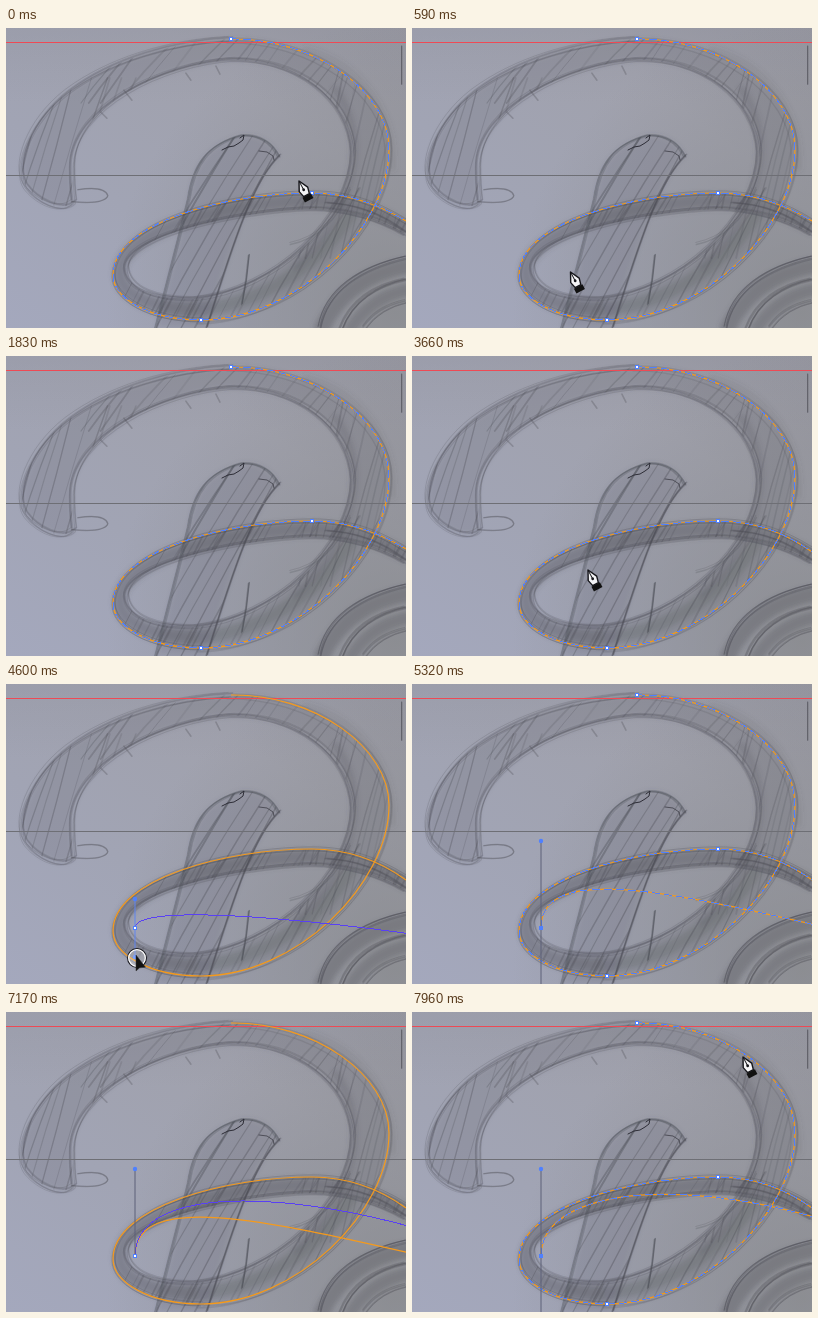
Animation, 400 px wide and 300 px high, one loop 8 s. Source, as an HTML page:

```html
<!DOCTYPE html>
<html lang="en">
<head>
<meta charset="utf-8">
<title>Tracing a pencil letter</title>
<style>
html, body { margin: 0; width: 100%; height: 100%; overflow: hidden; background: #9fa1af; }
svg { display: block; width: 400px; height: 300px; }
path, line { fill: none; }
.ink path { stroke: #4c4d55; stroke-linecap: round; }
.ink .fill { fill: #54555c; stroke: none; }
.orange { stroke: #f59a1c; stroke-width: 1.2; }
.blue { stroke: #4f80ff; stroke-width: 1; stroke-dasharray: 8 4; shape-rendering: crispEdges; }
.drag { stroke: #5940f4; stroke-width: 1; shape-rendering: crispEdges; }
.anchor { fill: #fff; stroke: #4f80ff; stroke-width: 1; }
.knob { fill: #4f80ff; }
</style>
</head>
<body>
<svg viewBox="0 0 400 300">
  <defs>
    <linearGradient id="paper" x1="0" y1="1" x2="1" y2="0">
      <stop offset="0" stop-color="#a4a8bd"/>
      <stop offset=".35" stop-color="#a1a4b4"/>
      <stop offset=".7" stop-color="#a0a1ac"/>
      <stop offset="1" stop-color="#96969e"/>
    </linearGradient>
    <linearGradient id="shade" x1="0" y1="0" x2="0" y2="1">
      <stop offset="0" stop-color="#8f919f" stop-opacity=".3"/>
      <stop offset=".25" stop-color="#8f919f" stop-opacity="0"/>
    </linearGradient>
    <radialGradient id="corner" gradientUnits="userSpaceOnUse" cx="390" cy="285" r="290">
      <stop offset="0" stop-color="#838485" stop-opacity=".7"/>
      <stop offset=".5" stop-color="#86878a" stop-opacity=".4"/>
      <stop offset="1" stop-color="#86878a" stop-opacity="0"/>
    </radialGradient>
    <filter id="soft"><feGaussianBlur stdDeviation="2.6"/></filter>
    <filter id="grain"><feGaussianBlur stdDeviation=".65"/></filter>
    <clipPath id="inSwash"><path id="swashClip"/></clipPath>
    <clipPath id="inStem"><path id="stemClip"/></clipPath>
  </defs>

  <rect width="400" height="300" fill="url(#paper)"/>
  <rect width="400" height="300" fill="url(#shade)"/>
  <rect width="400" height="300" fill="url(#corner)"/>

  <g class="ink">
    <g id="tone" filter="url(#soft)"></g>
    <g filter="url(#grain)">
      <g id="swashHatch" clip-path="url(#inSwash)"></g>
      <g id="stemHatch" clip-path="url(#inStem)"></g>
      <g id="lines"></g>
    </g>
    <path d="M216 122l6-3 6-1 5-3 4-3 1-5-4 3" style="stroke:#2d2d36"/>
    <path d="M253 123l8 1 6 4 1 4" style="stroke:#34343d" opacity=".7"/>
  </g>

  <rect y="147" width="400" height="1" fill="#6e6f75"/>
  <rect y="14" width="400" height="1" fill="#ee4a55"/>

  <path id="oldOrange" class="orange"/>
  <path id="newOrange" class="orange"/>
  <path id="oldBlue" class="blue"/>
  <path id="newBlue" class="blue"/>
  <path id="preview" class="drag"/>
  <line id="handle" x1="129" x2="129" stroke-width="1"/>
  <circle id="knobUp" class="knob" cx="129" r="2.2"/>
  <circle id="knobDown" class="knob" cx="129" r="2.2"/>
  <rect id="node" class="anchor" x="127.5" y="242.5" width="3" height="3"/>
  <g id="anchors" class="anchor">
    <rect x="223.5" y="9.5" width="3" height="3"/>
    <rect x="193.5" y="290.5" width="3" height="3"/>
    <rect x="304.5" y="163.5" width="3" height="3"/>
  </g>

  <g id="arrow">
    <circle cx="1" cy="1" r="9.4" fill="#fff" fill-opacity=".25" stroke="#1c1c22" stroke-width="1.2"/>
    <circle cx="1" cy="1" r="8.3" fill="none" stroke="#fff" stroke-width="1.2"/>
    <path d="M0 -2V14L3.600 10.800 9.500 10.200Z" style="fill:#111" stroke="#333" stroke-width=".5"/>
  </g>
  <g id="pen">
    <g transform="rotate(-28)">
      <path d="M0 0L4.800 9.500 3.200 16H-3.200L-4.800 9.500Z" style="fill:#f4f4f6" stroke="#15151a" stroke-width="1.4" stroke-linejoin="round"/>
      <path d="M0 1V9" stroke="#15151a" stroke-width="1"/>
      <circle cy="10" r="1.4" fill="#15151a"/>
      <rect x="-4.800" y="16.300" width="9.600" height="5.400" fill="#111"/>
    </g>
  </g>
</svg>

<script>
const $ = id => document.getElementById(id);
const LOOP = 8000, STEP = 58.8;

// ---- pencil sketch ----
let seed = 11;
const rnd = () => (seed = (seed * 16807) % 2147483647) / 2147483647;
const jitter = r => (rnd() - .5) * 2 * r;

function addPath(parent, d, attrs) {
  const p = document.createElementNS('http://www.w3.org/2000/svg', 'path');
  p.setAttribute('d', d);
  for (const k in attrs) p.setAttribute(k, attrs[k]);
  $(parent).append(p);
}
const tone = (d, width, opacity) => addPath('tone', d, { 'stroke-width': width, opacity });
function pencil(d, times = 3, spread = 1.5, opacity = .25) {
  for (let i = 0; i < times; i++) addPath('lines', d, {
    'stroke-width': .8 + rnd() * .8, opacity,
    transform: `translate(${jitter(spread)} ${jitter(spread)})`
  });
}
function hatch(parent, x0, x1, gap, y0, y1, lean, opacity) {
  for (let x = x0; x < x1; x += gap * (.5 + rnd())) {
    addPath(parent, `M${x} ${y1}Q${x + lean * .45} ${(y0 + y1) / 2} ${x + lean + jitter(9)} ${y0}`,
      { 'stroke-width': .8 + rnd() * 1.2, opacity: opacity * (.5 + rnd() * .8) });
  }
}

const bowl = 'C308 10 383 63 383 121C383 200 290 292 195 292';
const loop = 'C143 292 107 270 107 247C107 195 220 165 306 165';
const tail = y => `C345 165 375 178 400 ${y}`;
const trace = y => 'M225 11' + bowl + loop + tail(y);
const leftEdge = 'M68 174C55 186 30 172 20 158C8 140 22 95 62 64C105 32 165 14 225 11';
const innerLoop = 'M400 207C370 190 340 182 306 181C230 184 122 207 120 240C121 262 150 273 190 271';
const innerTop = 'C270 262 346 190 347 125C344 70 290 32 225 32C160 36 66 78 66 140Q66 160 68 174';
const swash = leftEdge + bowl + loop + tail(194) + innerLoop.replace('M', 'L') + innerTop + 'Z';
const stemLeft = 'M150 300C160 262 172 215 183 170C188 136 202 116 236 107';
const stemTop = 'Q262 106 273 128';
const stemRight = 'M273 128C248 150 228 210 200 300';
const stem = stemLeft + stemTop + stemRight.replace('M273 128', '') + 'Z';

$('swashClip').setAttribute('d', swash);
$('stemClip').setAttribute('d', stem);
addPath('tone', swash, { class: 'fill', opacity: .19 });
addPath('tone', stem, { class: 'fill', opacity: .16 });
addPath('tone', 'M195 292' + loop + tail(194) + innerLoop.replace('M', 'L') + 'Z', { class: 'fill', opacity: .07 });
tone('M345 185C310 245 240 282 185 281C135 279 112 262 114 243C118 205 220 173 306 173Q355 174 400 199', 13, .22);
tone('M330 62C362 110 352 180 290 238', 8, .2);
tone('M300 22C360 38 388 90 386 140', 8, .1);
tone('M316 300Q340 250 400 238', 16, .32);
tone('M345 300Q365 270 400 262', 13, .28);

hatch('swashHatch', 5, 90, 10, 50, 185, 42, .34);
hatch('swashHatch', 75, 320, 15, 5, 75, 55, .22);
hatch('swashHatch', 285, 385, 9, 30, 230, 48, .22);
hatch('swashHatch', 105, 350, 8, 160, 295, 75, .26);
hatch('stemHatch', 90, 265, 11, 100, 300, 115, .38);

pencil(leftEdge, 6, 3, .2);
pencil('M225 11' + bowl, 4, 4, .16);
pencil('M195 292' + loop + tail(194), 4, 2.5, .26);
pencil(innerLoop + innerTop, 6, 3, .2);
pencil(stemLeft + stemTop, 4, 1.8, .26);
pencil(stemRight, 4, 1.8, .32);
pencil('M313 300C320 262 355 240 400 230', 5, 2.5, .32);
pencil('M335 300C345 272 370 256 400 250', 5, 2.5, .3);
pencil('M358 300Q372 280 400 274', 4, 2.5, .28);
pencil('M285 215Q325 207 345 160', 2, 2, .22);
pencil('M320 175Q365 177 400 205', 3, 2, .25);
pencil('M72 162Q99 158 102 168Q99 177 66 174', 2, .8, .28);
pencil('M243 227Q241 252 236 276', 3, .8, .4);
pencil('M396 18V56', 3, .8, .35);
pencil('M118 62l8 10M180 45l5 7M210 38l4 8M95 84l6 6', 1, 1, .3);

// ---- traced paths ----
const lerp = (a, b, k) => a + (b - a) * k;
const progress = (n, a, b) => Math.min(1, Math.max(0, (n - a) / (b - a)));
function track(keys, n) {
  for (let i = 1; i < keys.length; i++) {
    const a = keys[i - 1], b = keys[i];
    if (n <= b[0]) {
      const k = progress(n, a[0], b[0]);
      return a.slice(1).map((v, j) => lerp(v, b[j + 1], k));
    }
  }
  return keys[keys.length - 1].slice(1);
}
const curve = (reach, k) =>
  `M129 244C129 ${244 - reach} ${lerp(358, 365, k)} ${lerp(237.6, 157, k)} 572 277`;

// Each key: step, x, y. A track is live from its first step until `end`.
const penTracks = [
  { end: 31, keys: [[0, 293, 153], [2, 309, 160], [5, 250, 208], [9, 145, 248], [11, 172, 240],
    [14, 240, 218], [16, 240, 210], [19, 152, 240], [22, 126, 245], [25, 142, 240],
    [28, 195, 246], [29, 255, 241], [30, 362, 236]] },
  { end: 72, keys: [[60, 330, 213], [61, 240, 208], [62, 176, 214], [65, 148, 232], [69, 131, 242], [72, 129, 244]] },
  { end: 96, keys: [[93, 203, 285], [96, 203, 285]] },
  { end: 137, keys: [[132, 388, 130], [133, 366, 95], [134, 345, 62], [135, 331, 45]] }
];
const reachKeys = [[72, 0], [74, 3], [78, 29], [82, 66], [86, 97], [88, 87]];

const show = (id, on) => { $(id).style.display = on ? '' : 'none'; };
const setPath = (d, ...ids) => ids.forEach(id => $(id).setAttribute('d', d));
const place = (id, p) => {
  show(id, p);
  if (p) $(id).setAttribute('transform', `translate(${p[0]} ${p[1]})`);
};
const within = (n, a, b) => n >= a && n < b;

function draw(n) {
  const tailDrag = within(n, 45, 57);
  const pointDrag = within(n, 72, 89);
  const bendDrag = within(n, 113, 128);
  const selected = !(tailDrag || pointDrag || bendDrag);
  const placed = n >= 72, saved = n >= 89;

  show('oldBlue', selected);
  show('anchors', selected);
  show('newOrange', saved);
  show('newBlue', saved && selected);
  show('preview', !selected);
  for (const id of ['handle', 'knobUp', 'node']) show(id, placed);
  show('knobDown', pointDrag);

  const tailY = lerp(193, 196, progress(n, 45, 50));
  setPath(trace(tailY), 'oldOrange', 'oldBlue');
  if (tailDrag) setPath('M306 165' + tail(tailY), 'preview');

  const pen = penTracks.find(p => within(n, p.keys[0][0], p.end));
  place('pen', pen && track(pen.keys, n));

  if (!placed) return place('arrow', null);
  const reach = track(reachKeys, n)[0];
  setPath(curve(reach, n >= 128 ? 1 : 0), 'newOrange', 'newBlue');
  if (!selected) setPath(curve(reach, progress(n, 113, 125)), 'preview');

  $('handle').setAttribute('y1', 244 - reach);
  $('handle').setAttribute('y2', bendDrag ? 244 : 244 + reach);
  $('handle').setAttribute('stroke', pointDrag ? '#5f84f0' : '#5c6078');
  $('knobUp').setAttribute('cy', 244 - reach);
  $('knobDown').setAttribute('cy', 244 + reach);
  $('node').style.fill = selected ? '#4f80ff' : '#fff';
  place('arrow', pointDrag && [130, 244 + reach]);
}

const start = performance.now();
function tick() {
  const t = (performance.now() - start) % LOOP;
  draw(Math.floor((t + 10) / STEP));
  requestAnimationFrame(tick);
}
tick();
</script>
</body>
</html>
```
